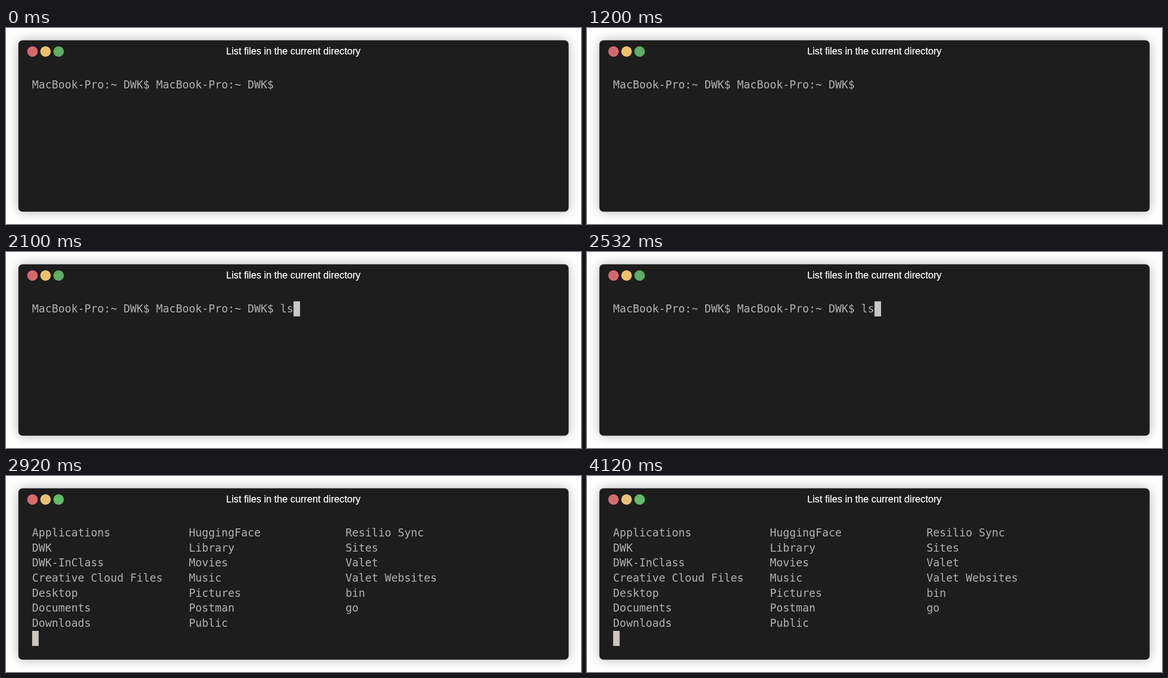
These frames come from a looping animation (1279x438 px, 4.92 s). An HTML page:

```html
<!DOCTYPE html>
<html lang="en">
<head>
<meta charset="utf-8">
<title>List files in the current directory</title>
<style>
  html, body { margin: 0; width: 100%; height: 100%; overflow: hidden; background: #fff; }
  .shadow {
    position: absolute; left: 28px; top: 28px; width: 1223px; height: 382px;
    border-radius: 9px; box-shadow: 0 0 26px rgba(0, 0, 0, .3);
  }
  svg { position: absolute; left: 0; top: 0; }
  .title {
    font: 21.6px "Liberation Sans", Arial, sans-serif;
    fill: #fff; stroke: #fff; stroke-width: .3px;
  }
  #lines { font: 24.14px "DejaVu Sans Mono", "Noto Sans Mono", monospace; fill: #b0b0b0; }
  #lines text { white-space: pre; }
</style>
</head>
<body>
<div class="shadow"></div>
<svg width="1279" height="438">
  <rect x="27.5" y="27.5" width="1224" height="383" rx="9" fill="#1d1d1d"/>
  <g id="dots">
    <circle cx="59" cy="52.5" r="11.6"/>
    <circle cx="88" cy="52.5" r="11.6"/>
    <circle cx="117" cy="52.5" r="11.6"/>
  </g>
  <text class="title" x="489.8" y="59">List files in the current directory</text>
  <g id="lines"></g>
  <rect id="cursor" width="14.535" height="33.7"/>
</svg>
<script>
const LOOP = 4920, LEFT = 58.1, TOP = 110.2, CHAR = 14.535, ROW = 33.7;
const $ = id => document.getElementById(id);

const prompt = "MacBook-Pro:~ DWK$ ".repeat(2);
const columns = [
  ["Applications", "DWK", "DWK-InClass", "Creative Cloud Files", "Desktop", "Documents", "Downloads"],
  ["HuggingFace", "Library", "Movies", "Music", "Pictures", "Postman", "Public"],
  ["Resilio Sync", "Sites", "Valet", "Valet Websites", "bin", "go", ""]
];
const listing = columns[0].map((_, row) => columns.map(col => col[row].padEnd(24)).join(""));

const calm = ["#d5696a", "#f0c06e", "#5eae63"];
const warm = ["#ee7a62", "#f2b267", "#5cc065"];
const soft = ["#d66c6a", "#e8c27c", "#62bb68"];

// cursor is [column, row]
const steps = [
  { at: 0, rows: [prompt], dots: calm },
  { at: 2000, rows: [prompt + "l"], cursor: [39, 0], dots: calm },
  { at: 2100, rows: [prompt + "ls"], cursor: [40, 0], dots: calm },
  { at: 2820, rows: [prompt + "ls"], cursor: [0, 1], dots: warm },
  { at: 2920, rows: listing, cursor: [0, 7], dots: soft, block: "#cbc6bb" }
];

function show({ rows, cursor, dots, block = "#c7c7c7" }) {
  $("lines").replaceChildren(...rows.map((row, i) => {
    const text = document.createElementNS("http://www.w3.org/2000/svg", "text");
    text.setAttribute("x", LEFT);
    text.setAttribute("y", TOP + 24.6 + i * ROW);
    text.textContent = row;
    return text;
  }));
  dots.forEach((color, i) => $("dots").children[i].setAttribute("fill", color));
  const box = $("cursor");
  box.setAttribute("visibility", cursor ? "visible" : "hidden");
  if (cursor) {
    box.setAttribute("x", LEFT + cursor[0] * CHAR);
    box.setAttribute("y", TOP + cursor[1] * ROW);
    box.setAttribute("fill", block);
  }
}

const start = performance.now();
let shown;
function tick() {
  const time = (performance.now() - start) % LOOP;
  const step = steps.findLast(s => s.at <= time);
  if (step !== shown) show(shown = step);
  requestAnimationFrame(tick);
}
tick();
</script>
</body>
</html>
```
